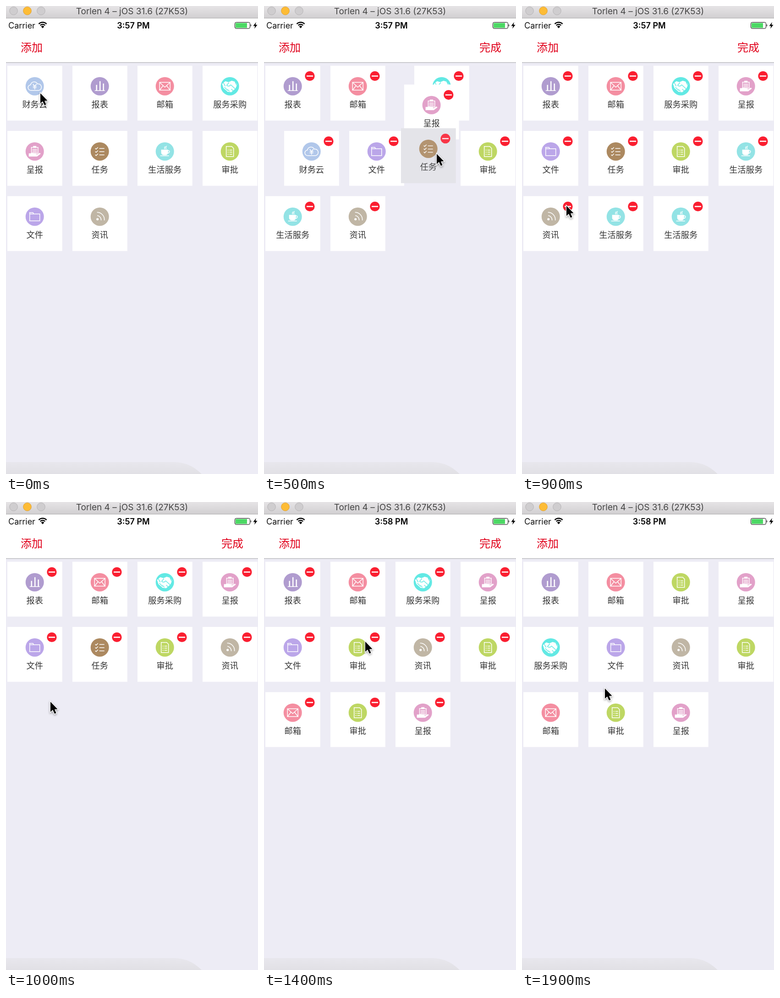
Recreate the animation shown at these times as an HTML page with a canvas. Size 550 by 1019 pixels, loop 2000 ms.

```html
<!DOCTYPE html>
<html lang="zh-CN">
<head>
<meta charset="utf-8">
<style>
  html, body { margin: 0; width: 550px; height: 1019px; overflow: hidden; background: #edecf5; }
  canvas { display: block; }
</style>
</head>
<body>
<canvas id="stage" width="550" height="1019"></canvas>
<script>
const ctx = document.getElementById('stage').getContext('2d');
const CJK = '"Noto Sans CJK SC", "Noto Sans CJK", sans-serif';
const LATIN = 'Inter, sans-serif';
const RED = '#e0001b', GREY = '#e4e4e9';

// key: [label, colour, white strokes, white fills, creases in the disc colour]
const apps = {
  财: ['财务云', '#b1c7ea', 'M-8 9a6 6 0 0 1-1-12 8 8 0 0 1 15-2 7 7 0 0 1 3 14zM-4-5L0 0 4-5M0 0V7M-4 0H4M-4 3H4'],
  报: ['报表', '#b09ccf', 'M-11 9.5H11M-7.5 9V-3M0 9V-11M7.5 9V-6M-6.5 9V-3M1 9V-11M8.5 9V-6'],
  邮: ['邮箱', '#f48ea1', 'M-11.5-8.5h23v17h-23zL0 2 11.5-8.5M-11.5 8.5L-4-1M11.5 8.5L4-1'],
  服: ['服务采购', '#62e9e4', '', 'M-17-5L-10-11-3-9 4-12 11-10 16-4 12 5 3 13-5 12-14 4z',
    'M-2-8L-7-2Q-3 2 2-3L12 6M-12 2L-8 6M-9 5L-5 9M-5 7L-1 11M3 6L7 10M11-10L15-2M-14-7L-10 0'],
  呈: ['呈报', '#e2a1c9', 'M-7.2-9H7.2V4H-7.2zM-5-4.5H5M-5-1.5H5M-5 1.5H5',
    'M-3.5-12h7v4h-7zM-13 4H-9Q-4 1.500 0 4.500H4V7L11 3 13 5 5 11H-13z'],
  任: ['任务', '#ac8960', 'M-10-7l2 2 4-4M-10 0l2 2 4-4M-10 7l2 2 4-4M-1-6.5H10M-1 .5H10M-1 7.500H10'],
  生: ['生活服务', '#93e3e5', 'M6-2q5 0 4 3q-1 3-5 3M-10 9.500H9M0-5q-2-3 1-6M3-5q-2-4 1-7',
    'M-8-4H7V2Q6 8 2 8H-3Q-8 7-8 2z'],
  审: ['审批', '#bed763', 'M-8-11H4L8-7V11H-8zM-5-3h2M-1-3H5M-5 1.500h2M-1 1.500H5M-5 6h2M-1 6H5'],
  文: ['文件', '#bba6e9', 'M-11-9H-4L-2-6H11V9H-11zM-11-6H-2'],
  资: ['资讯', '#c0b6a5', 'M-5.500-2.500A10 10 0 0 1 3 8M-6-9.500A16 16 0 0 1 10 8', 'M-7.500 5.500a2.500 2.500 0 1 0 5 0a2.500 2.500 0 1 0-5 0']
};
for (const app of Object.values(apps))
  for (let k = 2; k < 5; k++) app[k] = new Path2D(app[k] || '');

// each step: order, editing, cursor x, cursor y, [from, to, progress, grab offset x]
const sorted = '报邮服呈财文任审生资', trimmed = '报邮服呈文任审资', last = '报邮审呈服文资审邮审呈';
const steps = [
  ['财报邮服呈任生审文资', 0, 75, 190],
  ['财报邮服呈任生审文资', 1, 92, 212, [0, 0, 1, 75]],
  ['报邮服呈任财生审文资', 1, 226, 326, [0, 5, 0.6, 75]],
  ['报邮服呈任财文生审资', 1, 362, 338, [8, 6, 0.7, 75]],
  ['报邮任服呈财文审生资', 1, 366, 194, [4, 2, 0.6, 78]],
  [sorted, 1, 377, 322, [2, 6, 0.711, 78]],
  [sorted, 1, 495, 92],
  [sorted + '生生', 0, 53, 87],
  [sorted + '生生生', 0, 53, 87],
  ['报邮服呈文任审生资生生', 1, 97, 435],
  [trimmed, 1, 97, 435],
  [trimmed, 0, 495, 92],
  [trimmed + '审邮审呈', 0, 53, 87],
  [trimmed + '审邮审呈', 1, 221, 304],
  ['报邮服呈文审资审邮审呈', 1, 221, 304],
  ['服报邮审呈文资审邮审呈', 1, 98, 190, [2, 0, 0.7, 73]],
  [last, 1, 127, 336, [0, 4, 0.911, 73]],
  [last, 1, 495, 92],
  [last, 0, 450, 607],
  [last, 0, 181, 406]
];

const cell = i => [3 + 142 * (i % 4), 130 + 142 * Math.floor(i / 4)];

function box(x, y, w, h, fill) {
  ctx.fillStyle = fill;
  ctx.fillRect(x, y, w, h);
}

function disc(x, y, r, fill, stroke) {
  ctx.beginPath();
  ctx.arc(x, y, r, 0, 2 * Math.PI);
  ctx.fillStyle = fill;
  ctx.fill();
  if (stroke) {
    ctx.strokeStyle = stroke;
    ctx.lineWidth = 1;
    ctx.stroke();
  }
}

function text(str, x, y, font, fill, align = 'left') {
  ctx.font = font;
  ctx.fillStyle = fill;
  ctx.textAlign = align;
  ctx.fillText(str, x, y);
}

function fillPath(d, fill) {
  ctx.fillStyle = fill;
  ctx.fill(new Path2D(d));
}

function label(str, x, y, fill) {
  text(str, x + 59.7, y + 91, '500 18.2px ' + CJK, fill, 'center');
}

function tile(key, x, y, editing, dragged) {
  const [name, colour, lines, solids, creases] = apps[key];
  ctx.save();
  box(x, y, 119.7, 119.5, dragged ? GREY : '#fff');
  if (dragged) {
    ctx.globalAlpha = 0.88;
    ctx.filter = 'blur(0.6px)';
  }
  label(name, x, y, '#333');
  disc(x + 59.7, y + 44.7, 20, colour);
  if (editing) {
    disc(x + 97, y + 22.5, 10.6, '#fa1e30');
    box(x + 90, y + 21.3, 14, 2.5, '#fff');
  }
  ctx.translate(x + 59.7, y + 44.7);
  ctx.lineWidth = 1.5;
  ctx.strokeStyle = ctx.fillStyle = '#fff';
  ctx.stroke(lines);
  ctx.fill(solids);
  ctx.strokeStyle = colour;
  ctx.stroke(creases);
  ctx.restore();
}

function tiles(order, editing, cx, cy, move) {
  const [from, to, progress, grab] = move || [-1, -1, 1, 0];
  const place = i => {
    let old = i;
    if (i === to) old = from;
    else if (i >= from && i < to) old = i + 1;
    else if (i > to && i <= from) old = i - 1;
    const a = cell(old), b = cell(i);
    return a.map((v, k) => v + (b[k] - v) * progress);
  };
  if (move) {
    const [x, y] = place(to);
    label(apps[order[to]][0], x, y, GREY);
    disc(x + 97, y + 22.5, 10.6, GREY);
  }
  [...order].forEach((key, i) => {
    if (i !== to) tile(key, ...place(i), editing);
  });
  if (move) tile(order[to], cx - grab, cy - 55.8, editing, true);
}

function statusBar(time) {
  box(0, 27, 550, 96, '#fff');
  box(0, 122.5, 550, 1.3, '#b4b4b8');
  text('Carrier', 5, 48.5, '18px ' + LATIN, '#111');
  text(time, 278, 48.5, '600 18px ' + LATIN, '#000', 'center');

  ctx.strokeStyle = '#000';
  ctx.lineWidth = 2.6;
  for (const r of [7.5, 12]) {
    ctx.beginPath();
    ctx.arc(80, 47.5, r, -Math.PI * 0.75, -Math.PI * 0.25);
    ctx.stroke();
  }
  fillPath('M80 48.5L76.500 44.500Q80 41.500 83.500 44.500z', '#000');

  ctx.lineWidth = 1;
  ctx.beginPath();
  ctx.roundRect(499.5, 35.5, 33, 13.5, 3);
  ctx.stroke();
  box(501, 37, 25, 10.5, '#4cd964');
  fillPath('M534 39.500q2.500 2.500 0 5.500z', '#000');
  fillPath('M546 35L539.500 43.500H543.500L542 49.500 548.500 41H544.500z', '#000');
}

function frame() {
  const shade = ctx.createLinearGradient(0, 0, 0, 26);
  shade.addColorStop(0, '#e6e4e6');
  shade.addColorStop(1, '#d1cfd1');
  box(0, 0, 550, 26, shade);
  box(0, 26, 550, 1, '#aeacae');
  disc(16.5, 10.5, 8.8, '#cfcdcf', '#b5b3b5');
  disc(46.5, 10.5, 8.8, '#fdbc36', '#dfa032');
  disc(76.5, 10.5, 8.8, '#cfcdcf', '#b5b3b5');
  text('Torlen 4 – jOS 31.6 (27K53)', 275, 18, '19px ' + LATIN, '#444', 'center');
}

function corner() {
  const shade = ctx.createLinearGradient(0, 993, 0, 1019);
  shade.addColorStop(0, '#e8e7ed');
  shade.addColorStop(1, '#e1e0e5');
  fillPath('M0 993H365C395 993 412 1005 427 1019H0z', shade);
}

function cursor(x, y) {
  const arrow = new Path2D('M0 0V22L5 17.500 9 26 12.500 24.500 9 16.500 15.500 16z');
  ctx.save();
  ctx.translate(x, y);
  ctx.save();
  ctx.shadowColor = 'rgba(0,0,0,.4)';
  ctx.shadowBlur = 4;
  ctx.shadowOffsetY = 2;
  ctx.strokeStyle = '#fff';
  ctx.lineWidth = 2.6;
  ctx.stroke(arrow);
  ctx.restore();
  ctx.fillStyle = '#000';
  ctx.fill(arrow);
  ctx.restore();
}

function draw(now) {
  const n = Math.floor((now % 2000) / 100);
  const step = steps[n], [, editing, cx, cy] = step;
  box(0, 0, 550, 1019, '#edecf5');
  corner();
  tiles(...step);
  frame();
  statusBar(n < 12 ? '3:57 PM' : '3:58 PM');
  text('添加', 32, 99, '24px ' + CJK, RED);
  if (editing) text('完成', 470, 99, '24px ' + CJK, RED);
  cursor(cx, cy);
}

const start = performance.now();
(function loop() {
  draw(performance.now() - start);
  requestAnimationFrame(loop);
})();
</script>
</body>
</html>
```
